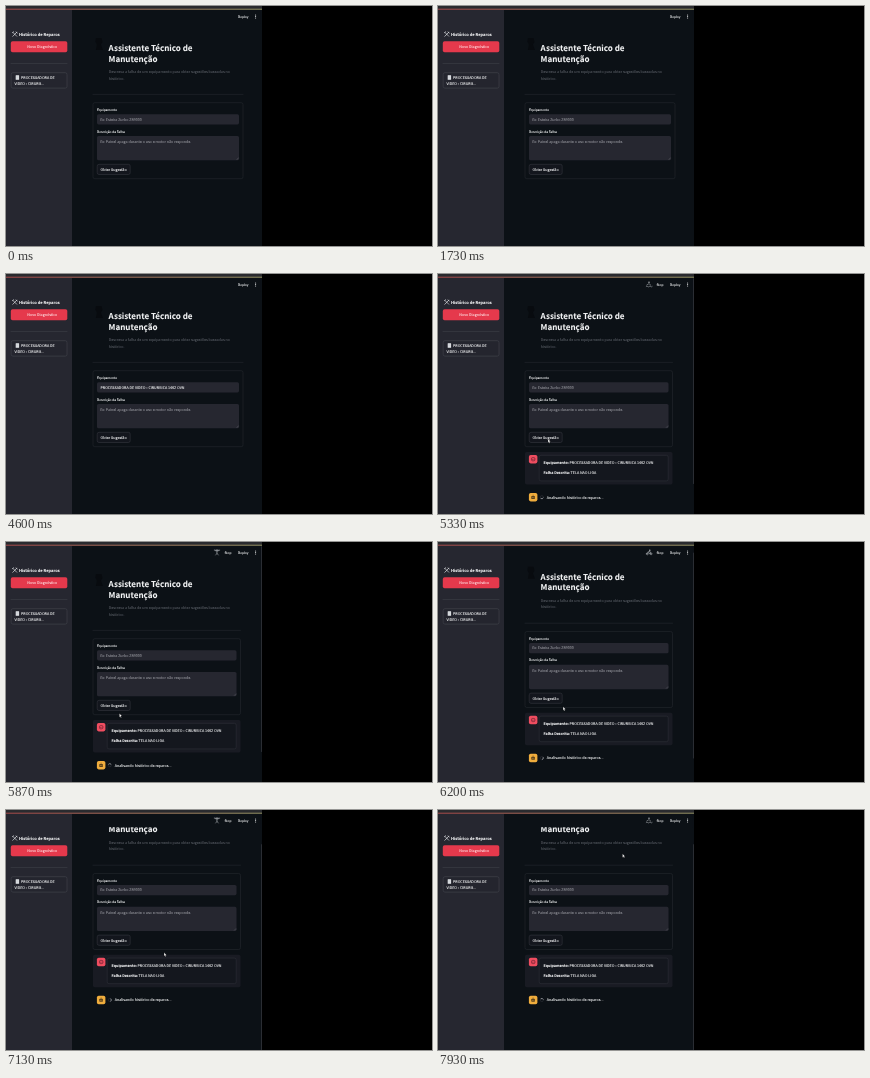
Recreate the animation shown at these times as an HTML page. Size 426 px wide and 240 px high, loop 8000 ms.

```html
<!DOCTYPE html>
<html lang="pt-BR">
<head>
<meta charset="utf-8">
<title>Assistente Técnico de Manutenção</title>
<style>
html, body { margin: 0; width: 100%; height: 100%; overflow: hidden; background: #000; }
svg { display: block; width: 426px; height: 240px; }
text {
  font-family: "Noto Sans CJK JP", "Noto Sans CJK SC", Lato, sans-serif;
  text-rendering: geometricPrecision; white-space: pre; stroke-width: .09px;
}
</style>
</head>
<body>
<svg id="stage" viewBox="0 0 426 240">
  <defs>
    <linearGradient id="strip"><stop stop-color="#a5484a"/><stop offset="1" stop-color="#8b8a5c"/></linearGradient>
    <clipPath id="mainClip"><rect x="66" y="4" width="190" height="236"/></clipPath>
  </defs>
  <g id="scene"></g>
</svg>
<script>
const LOOP = 8000;
const FOCUS = 2990, TYPE = 3400, TYPED = 4150, BLUR = 4420;
const FOCUS2 = 4690, TYPE2 = 4760, TYPED2 = 5060, SUBMIT = 5300;
const DEVICE = 'PROCESSADORA DE VIDEO - CIRURGICA 1462 OVN';
const FAULT = 'TELA NAO LIGA';
const WHITE = '#f4f5f6', GREY = '#8f9097', EDGE = '#292c33', FIELD = '#262730', RED = '#e5394c';
const PX = .2288; // stage units per page pixel of type
const scene = document.getElementById('scene');

const clamp = v => Math.max(0, Math.min(1, v));
const span = (t, a, b) => clamp((t - a) / (b - a));
const ease = p => p * p * (3 - 2 * p);
const typed = (s, t, a, b) => s.slice(0, Math.round(s.length * span(t, a, b)));

const text = (x, y, size, s, fill = WHITE, weight = 400, extra = '') =>
  `<text x="${x}" y="${y}" font-size="${size * PX}" fill="${fill}" stroke="${fill}" font-weight="${weight}" ${extra}>${s}</text>`;
const box = (x, y, w, h, fill, r = 0, stroke = 'none') =>
  `<rect x="${x}" y="${y}" width="${w}" height="${h}" rx="${r}" fill="${fill}" stroke="${stroke}" stroke-width=".5"/>`;
const line = (d, stroke, width = .5, extra = '') =>
  `<path d="${d}" fill="none" stroke="${stroke}" stroke-width="${width}" stroke-linecap="round" ${extra}/>`;

// Pointer stops: time, x, y
const stops = [
  [2930, 152, 139], [3050, 128.5, 111], [4480, 128.5, 111], [4660, 114, 140], [5060, 114, 140],
  [5240, 110, 165], [5450, 110, 165], [5700, 113.4, 171.5], [6140, 113.4, 171.5],
  [6320, 157.1, 146.1], [7050, 157.1, 146.1], [7780, 184.5, 43.8], [LOOP, 184.5, 43.8]
];

function pointer(t) {
  const typing = (t > TYPE && t < 4620) || (t > TYPE2 && t < TYPED2);
  if (t < stops[0][0] || typing) return '';
  const i = stops.findIndex(s => s[0] > t);
  const [a, b] = [stops[i - 1], stops[i]];
  const p = ease(span(t, a[0], b[0]));
  const x = a[1] + (b[1] - a[1]) * p, y = a[2] + (b[2] - a[2]) * p;
  const overField = t < SUBMIT && ((y > 108 && y < 118.5) || (y > 130 && y < 154));
  const shape = overField
    ? line('M-.7-2.5H.7M0-2.5V2.5M-.7 2.5H.7', '#c9cacd')
    : '<path d="M0 0V3.7L.9 2.9L1.5 4.2L2.1 3.9L1.5 2.6H2.6Z" fill="#fff" stroke="#000" stroke-width=".25"/>';
  return `<g transform="translate(${x} ${y})">${shape}</g>`;
}

function sidebar() {
  return box(0, 4, 66, 236, FIELD)
    + line('M7 26.5L10.7 30.2M10.8 26.2L6.8 30.3M6.5 26.6L7.6 25.8M10 26L11.3 27', '#dfe1e4', .7)
    + text(13, 29.8, 17.6, 'Histórico de Reparos', WHITE, 700)
    + box(4.8, 35.3, 56.5, 11, RED, 1.8)
    + text(21.3, 42.2, 16, 'Novo Diagnóstico', '#ffe2e4')
    + line('M5 57.5H61', '#40424a')
    + box(5.2, 66.7, 55.8, 15.4, '#24252e', 1.8, '#484a52')
    + box(9.7, 69.2, 3.4, 4.5, '#e4e7ea', .3)
    + line('M10.5 70.8H12.3M10.5 72H12.3', '#8d949c', .3)
    + text(15, 72.8, 16, 'PROCESSADORA DE')
    + text(8.5, 79.3, 16, 'VIDEO - CIRURG...');
}

function form(t, right) {
  const sent = t >= SUBMIT;
  const device = sent ? '' : typed(DEVICE, t, TYPE, TYPED);
  const fault = sent ? '' : typed(FAULT, t, TYPE2, TYPED2);
  const focus = t > FOCUS && t < BLUR, focus2 = t > FOCUS2 && !sent;
  const w = right - 4 - 91;
  const field = (y, h, on) => box(91, y, w, h, FIELD, 1.6, on ? '#b83e4c' : 'none');
  const value = (y, s, hint) => s ? text(94.5, y, 16, s) : text(94.2, y, 16, hint, GREY);
  return box(87, 96.7, right - 87, 76, 'none', 1.8, EDGE)
    + text(91, 104.9, 14, 'Equipamento')
    + field(108.2, 10.2, focus)
    + value(114.6, device, 'Ex: Esteira Zurbo ZR9000')
    + (focus ? text(right - 6.5, 116, 11.4, 'Press Enter to submit form', '#b3b4ba', 400, 'text-anchor="end"') : '')
    + (focus && !device ? line('M94.7 110.8V115.6', WHITE, .4) : '')
    + text(91, 126.6, 14, 'Descrição da Falha')
    + field(130, 24.3, focus2)
    + value(137.4, fault, 'Ex: Painel apaga durante o uso e motor não responde.')
    + (focus2 && !fault ? line('M94.5 133.6V138.4', WHITE, .4) : '')
    + line(`M${right - 6.2} 153.4l1.6-1.6M${right - 5.2} 153.4l.6-.6`, '#888990', .25)
    + box(91.2, 158.3, 33, 10.2, '#13161d', 1.8, focus2 && t > 5220 ? RED : '#3a3d44')
    + text(94.5, 164.8, 16, 'Obter Sugestão');
}

function chat(t) {
  if (t < SUBMIT) return '';
  const turn = t * .36 % 360;
  return box(87, 178, 147.5, 32.5, '#191b23', 1.8)
    + box(90.9, 180.9, 8.5, 8.5, '#f04d60', 1.8)
    + '<rect x="93.5" y="183.6" width="3.4" height="3.2" rx="1" fill="none" stroke="#571c29" stroke-width=".6"/>'
    + line('M94.5 185.3V185.4M95.9 185.3V185.4', '#571c29', .6)
    + box(101.2, 181.3, 129, 25.6, '#14171e', 1.8, '#32353c')
    + text(105.5, 189.8, 16, 'Equipamento:', WHITE, 700)
    + text(131.5, 189.8, 16, DEVICE)
    + text(105.5, 200.4, 16, 'Falha Descrita:', WHITE, 700)
    + text(132.6, 200.4, 16, FAULT)
    + box(90.9, 218.9, 8.5, 8.5, '#f0ad3d', 1.8)
    + box(93.2, 222, 3.8, 3, '#5b421c', .8)
    + line('M95.1 222V221', '#5b421c')
    + line('M94.3 223.5V223.6M95.9 223.5V223.6', '#f0ad3d', .6)
    + '<circle cx="103.8" cy="223.2" r="1.6" fill="none" stroke="#34373e" stroke-width=".5"/>'
    + line('M103.8 221.6A1.6 1.6 0 0 1 105.4 223.2', '#d8dade', .5, `transform="rotate(${turn} 103.8 223.2)"`)
    + text(108.8, 224.5, 16, 'Analisando histórico de reparos...');
}

// Small athletes that alternate while the page is busy
const poses = [
  'M208.3 8.2H213.7M209 8.2L211 10.2L213 8.2M211 10.2V11.4M209.7 13L211 11.4L212.3 13',
  'M208.3 11.8a1 1 0 1 0 2 0a1 1 0 1 0-2 0M212 11.8a1 1 0 1 0 2 0a1 1 0 1 0-2 0M209.3 11.7L210.4 9.8L212 9.4L213 11.7M210.4 9.8L211.5 11.5',
  'M208.2 12.5q.8-.8 1.5 0t1.5 0t1.5 0t1.5 0M208.8 11L211 9.6L212.8 11.2'
];

function header(t) {
  const busy = t >= SUBMIT;
  const pose = Math.floor(t / 400 + 1) % poses.length;
  return box(66, 4, 188.5, 13.2, '#0c1116')
    + (busy ? line(poses[pose], '#c3c6ca', .5)
      + `<circle cx="${pose === 1 ? 211.8 : 211}" cy="8.3" r=".7" fill="#c3c6ca"/>`
      + text(218.5, 11.8, 14, 'Stop') : '')
    + text(232, 11.8, 14, 'Deploy')
    + [8.9, 10.5, 12.1].map(y => `<circle cx="249.6" cy="${y}" r=".5" fill="${WHITE}"/>`).join('');
}

function draw(t) {
  const right = t < SUBMIT ? 237 : 234.5;
  const scroll = 33.2 * ease(span(t, 6150, 6320));
  const bar = t < SUBMIT ? '' : box(255, 4 + scroll * .9, 1, 206, '#2a2d33', .5);
  scene.innerHTML = box(0, 0, 256, 240, '#0c1116')
    + `<g clip-path="url(#mainClip)"><g transform="translate(0 ${-scroll})">`
    + '<path d="M90 32h5.5l1 4-1.6 2.5 2 5.5h-7l1-5.5-1.6-3z" fill="#080b0f"/>'
    + text(102.6, 44.7, 35.2, 'Assistente Técnico de', WHITE, 700)
    + text(102.6, 55.6, 35.2, 'Manutenção', WHITE, 700)
    + text(102.7, 66.9, 16, 'Descreva a falha de um equipamento para obter sugestões baseadas no', '#555960')
    + text(102.7, 73.6, 16, 'histórico.', '#555960')
    + line(`M87 88.4H${right}`, EDGE)
    + form(t, right) + chat(t)
    + '</g></g>'
    + header(t) + bar + sidebar()
    + box(0, 0, 256, 4, '#2a2b2f') + box(0, 2.7, 256, 1, 'url(#strip)')
    + pointer(t);
}

function tick(now) {
  draw(now % LOOP);
  requestAnimationFrame(tick);
}
draw(0);
requestAnimationFrame(tick);
</script>
</body>
</html>
```
